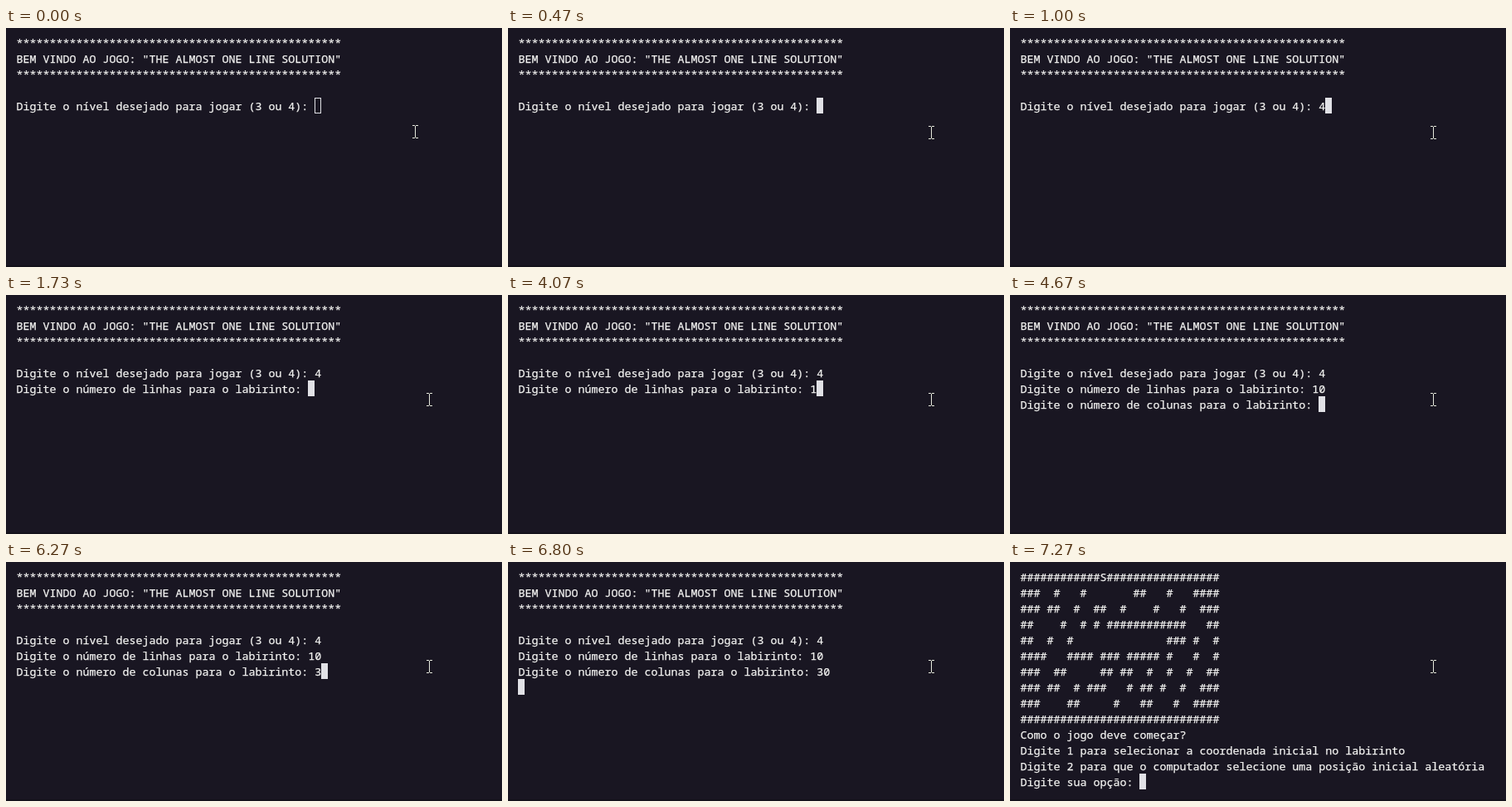
Animation of 598x288 px, one loop 8000 ms. Source, as an HTML page:

```html
<!DOCTYPE html>
<html lang="pt">
<head>
<meta charset="utf-8">
<title>Labirinto</title>
<style>
  html, body { margin: 0; width: 100%; height: 100%; overflow: hidden; background: #191622; }
  body { position: relative; }
  pre, #caret, #mouse, #edge { position: absolute; margin: 0; }
  pre { left: 12.5px; top: 9px; color: #f4f4f2; font: 500 13.3333px/19px "Noto Sans Mono", "DejaVu Sans Mono", monospace; font-variant-ligatures: none; -webkit-text-stroke: .25px; }
  #caret { box-sizing: border-box; width: 8px; height: 19px; border: 1px solid #e1e1e6; }
  #mouse { left: 0; top: 0; width: 7px; height: 16px; }
  #edge { left: 0; right: 0; bottom: 0; height: 2px; background: #13111b; }
</style>
</head>
<body>
<pre id="text"></pre>
<div id="caret"></div>
<svg id="mouse" fill="#e6e9dd" shape-rendering="crispEdges"><path d="M0 0h3v1h1v-1h3v1h-3v14h3v1h-3v-1h-1v1h-3v-1h3v-14h-3z"/></svg>
<div id="edge"></div>
<script>
const LOOP = 8000, CELL = 8, ROW = 19;
const $ = id => document.getElementById(id);

const stars = "*".repeat(49);
const level = `${stars}
BEM VINDO AO JOGO: "THE ALMOST ONE LINE SOLUTION"
${stars}

Digite o nível desejado para jogar (3 ou 4): `;
const lines = level + "4\nDigite o número de linhas para o labirinto: ";
const columns = lines + "10\nDigite o número de colunas para o labirinto: ";
const maze = `############S#################
###  #   #       ##   #   ####
### ##  #  ##  #    #   #  ###
##    #  # # ############   ##
##  #  #              ### #  #
####   #### ### ##### #   #  #
###  ##     ## ##  #  #  #  ##
### ##  # ###   # ## #  #  ###
###    ##     #   ##   #  ####
##############################
Como o jogo deve começar?
Digite 1 para selecionar a coordenada inicial no labirinto
Digite 2 para que o computador selecione uma posição inicial aleatória
Digite sua opção: `;

// [start time, value]
const screens = [
  [0, level], [1000, level + "4"], [1670, level + "4\n"],
  [1730, lines], [4070, lines + "1"], [4330, lines + "10"], [4600, lines + "10\n"],
  [4670, columns], [6270, columns + "3"], [6530, columns + "30"], [6800, columns + "30\n"],
  [7270, maze]
];
const pointer = [[0, [490, 117]], [130, [488, 117]], [400, [499, 118]], [470, [507, 118]]];

const at = (steps, t) => steps.filter(s => s[0] <= t).pop()[1];

function draw(t) {
  const text = at(screens, t);
  const rows = text.split("\n");
  const [x, y] = at(pointer, t);
  if ($("text").textContent !== text) $("text").textContent = text;
  const caret = $("caret").style;
  caret.left = 12 + rows[rows.length - 1].length * CELL + "px";
  caret.top = 8 + (rows.length - 1) * ROW + "px";
  caret.background = t < 70 ? "none" : "#e1e1e6";
  $("mouse").style.transform = `translate(${x}px, ${y}px)`;
}

let start;
function tick(now) {
  start ??= now;
  draw((now - start) % LOOP);
  requestAnimationFrame(tick);
}
draw(0);
requestAnimationFrame(tick);
</script>
</body>
</html>
```
